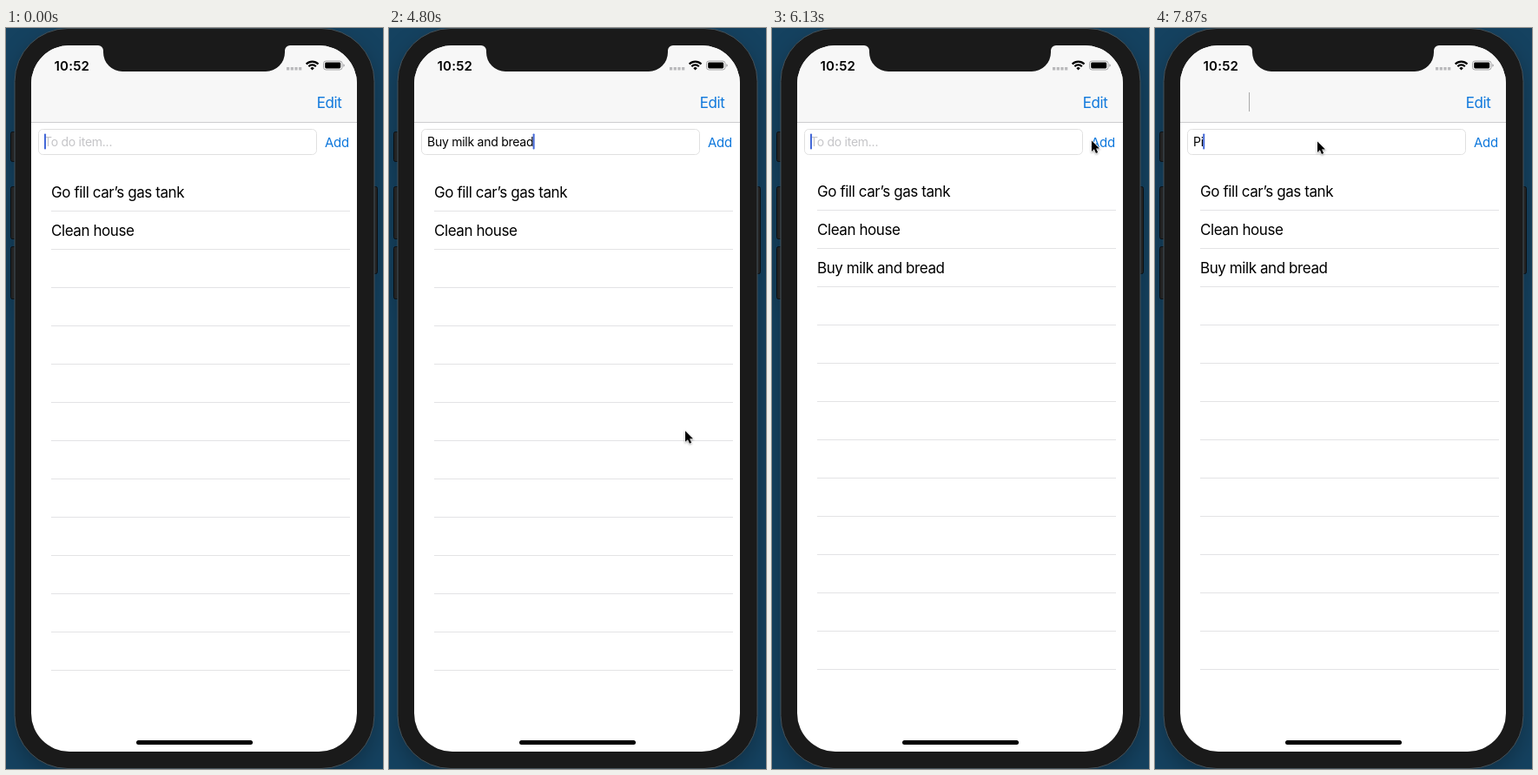
These frames come from a looping animation (434 px wide and 852 px high, 8 s). An HTML page:

```html
<!DOCTYPE html>
<html lang="en">
<head>
<meta charset="utf-8">
<title>To do list</title>
<style>
  html, body { margin: 0; width: 100%; height: 100%; overflow: hidden; background: #154260; }
  svg { display: block; width: 434px; height: 852px; }
  text { font-family: Inter, Roboto, "Liberation Sans", sans-serif; white-space: pre; }
  .row { font-size: 17px; letter-spacing: -0.42px; }
  .field { font-size: 14px; letter-spacing: -0.26px; }
  .link { fill: #0f78dc; }
  .key { fill: #232323; stroke: #0b0f12; }
  #body { filter: drop-shadow(0 10px 12px rgba(0, 0, 0, .25)); }
  #pointer { filter: drop-shadow(0 1px 1px rgba(0, 0, 0, .35)); }
</style>
</head>
<body>
<svg viewBox="0 0 434 852">
  <defs>
    <clipPath id="screen"><rect x="29" y="20" width="375" height="812" rx="44"/></clipPath>
  </defs>
  <rect width="434" height="852" fill="#154260"/>

  <!-- phone body -->
  <g id="body">
    <rect class="key" x="5.5" y="119.5" width="8" height="34" rx="2"/>
    <rect class="key" x="5.5" y="182.5" width="8" height="60" rx="2"/>
    <rect class="key" x="5.5" y="251.5" width="8" height="60" rx="2"/>
    <rect class="key" x="419.5" y="182.5" width="8" height="100" rx="2"/>
    <rect x="10" y="0.5" width="414" height="851" rx="61" fill="#1a1a1a" stroke="#45525a"/>
  </g>

  <g clip-path="url(#screen)">
    <rect x="29" y="20" width="375" height="812" fill="#fff"/>
    <rect x="29" y="20" width="375" height="88" fill="#f7f7f7"/>
    <rect x="29" y="108" width="375" height="1" fill="#cdcdcf"/>
    <path d="M106 19V20a6 6 0 0 1 6 6V28a22 22 0 0 0 22 22H299a22 22 0 0 0 22-22V26a6 6 0 0 1 6-6V19z" fill="#1a1a1a"/>

    <!-- status bar -->
    <text x="75.8" y="48.5" text-anchor="middle" font-size="15" font-weight="600" letter-spacing="0.2">10:52</text>
    <path d="M323 46.8H341" stroke="#b9b9bb" stroke-width="3.4" stroke-dasharray="3.2 1.5"/>
    <g transform="translate(352.6 48.4)" fill="none" stroke="#000" stroke-width="2.3">
      <path d="M-6.9-6.9A9.8 9.8 0 0 1 6.9-6.9M-4.2-4.2A5.9 5.9 0 0 1 4.2-4.2"/>
      <path d="M0 0L-2.2-2.2A3.1 3.1 0 0 1 2.2-2.2z" fill="#000" stroke="none"/>
    </g>
    <rect x="365.5" y="38" width="21.5" height="10" rx="2.8" fill="none" stroke="#a3a3a5"/>
    <rect x="367.2" y="39.6" width="18" height="6.8" rx="1.4"/>
    <path d="M388.3 41.2q1.6.6 1.6 1.8t-1.6 1.8z" fill="#a3a3a5"/>

    <text class="row link" x="357.8" y="92.4">Edit</text>
    <text class="link" id="add" x="367.1" y="136.5" font-size="15" letter-spacing="-0.35">Add</text>

    <g id="list">
      <g id="lines" fill="#e3e3e5"></g>
      <text class="row" x="52" y="195">Go fill car’s gas tank</text>
      <text class="row" x="52" y="239">Clean house</text>
      <text class="row" id="item" x="52" y="283">Buy milk and bread</text>
    </g>

    <!-- entry field -->
    <rect x="37.5" y="116.5" width="320" height="29" rx="5" fill="#fff" stroke="#e0e0e0"/>
    <text class="field" id="hint" x="44" y="135.8" fill="#c5c5c8">To do item...</text>
    <text class="field" id="typed" x="44" y="135.8"></text>
    <rect id="caret" y="121.5" width="2" height="18" rx="0.8" fill="#4468d8"/>

    <!-- menu -->
    <g id="menu">
      <path d="M45 67H103a6 6 0 0 1 6 6V97a6 6 0 0 1-6 6H66L57 112 48 103H45a6 6 0 0 1-6-6V73a6 6 0 0 1 6-6z" fill="#1c1c1c"/>
      <text id="paste" x="74" y="90" text-anchor="middle" font-size="14" fill="#fff">Paste</text>
    </g>
    <rect id="edge" x="108" y="74" width="1" height="22" fill="#a9a9a9"/>
    <rect x="150" y="819" width="134" height="5" rx="2.5"/>
  </g>

  <g id="pointer">
    <path d="M0 0V14.2L3.3 11.2 5.6 16.4 8.1 15.3 5.8 10.2H10.2z" transform="scale(.88)"
      stroke="#fff" stroke-width="1.3" paint-order="stroke"/>
  </g>
</svg>
<script>
const LOOP = 8000, STEP = 200 / 3;
const TAP = 5660, CLEAR = 5800, DONE = 6066;
const $ = id => document.getElementById(id);

// Each word starts at its own time, then runs at one pace
const PACE = 120;
const keysOf = (start, word) => [...word].map((char, i) => ({ char, time: start + i * PACE }));
const keys = [
  keysOf(1330, "Buy "), keysOf(2000, "milk "), keysOf(2650, "and "), keysOf(3070, "bread"),
  keysOf(7600, "Pi")
].flat();
const wakes = [-140, CLEAR, ...keys.map(k => k.time)];

// Pointer moves along Bezier curves
const moves = [
  { from: 300, to: 600, points: [[331, 477], [328, 485.5]] },
  { from: 4640, to: 5450, points: [[328, 485.5], [400, 368], [470, 180], [378, 108]] },
  { from: 5450, to: 5650, points: [[378, 108], [368, 129.5]] },
  { from: 6230, to: 6740, points: [[368, 129.5], [187, 130.5]] }
];

const ramp = (t, a, b) => Math.max(0, Math.min(1, (t - a) / (b - a)));
const ease = p => p * p * (3 - 2 * p);
const glide = p => p * p * p * (p * (6 * p - 15) + 10);

function bezier(points, p) {
  if (points.length === 1) return points[0];
  return bezier(points.slice(1).map((b, i) => b.map((v, n) => points[i][n] + (v - points[i][n]) * p)), p);
}

function pointerAt(t) {
  const m = moves.filter(m => m.from <= t).pop() || moves[0];
  return bezier(m.points, glide(ramp(t, m.from, m.to)));
}

function textAt(t) {
  return keys.filter(k => k.time <= t && (k.time > CLEAR || t < CLEAR)).map(k => k.char).join("");
}

// Steady after each wake, then fades out and back once a second
function caretAt(t) {
  const phase = (t - Math.max(...wakes.filter(w => w <= t))) % 1000;
  return Math.max(1 - ramp(phase, 470, 740), ramp(phase, 930, 1000));
}

function addLine(y) {
  const r = document.createElementNS("http://www.w3.org/2000/svg", "rect");
  Object.entries({ x: 52, y, width: 344, height: 1 }).forEach(([k, v]) => r.setAttribute(k, v));
  return $("lines").appendChild(r);
}
const lineY = i => 210 + 44 * i;
const rules = Array.from({ length: 13 }, (_, i) => addLine(lineY(i)));
const fresh = addLine(lineY(2));

function draw(ms) {
  const t = Math.floor((ms + 4) / STEP) * STEP + 5;

  const text = textAt(t);
  $("typed").textContent = text;
  $("hint").style.opacity = text ? 0 : 1;
  $("caret").setAttribute("x", 44 + (text ? $("typed").getComputedTextLength() - 0.6 : 0));
  $("caret").style.opacity = caretAt(t);

  const done = t >= DONE;
  const p = ease(ramp(t, CLEAR, CLEAR + 300));
  const shift = done ? 0 : Math.round(44 * p);
  rules.forEach((r, i) => r.setAttribute("y", lineY(i) + (i > 1 ? shift : 0)));
  $("list").setAttribute("transform", `translate(0 ${done ? -1 : 0})`);
  fresh.style.opacity = done ? 0 : p * p;
  $("item").style.opacity = done ? 1 : p;
  $("add").style.opacity = t < TAP ? 1 : 0.2 + 0.8 * ramp(t, CLEAR, DONE);

  const shown = ramp(t, 6880, 7110) * (1 - ramp(t, 7590, 7790));
  $("menu").style.opacity = shown;
  $("paste").style.opacity = shown * shown;
  $("edge").style.opacity = t > 7660 ? 1 : 0;

  $("pointer").setAttribute("transform", `translate(${pointerAt(t)})`);
  $("pointer").style.opacity = t < 60 ? 0 : 1;
}

function frame() {
  draw(performance.now() % LOOP);
  requestAnimationFrame(frame);
}
frame();
</script>
</body>
</html>
```
